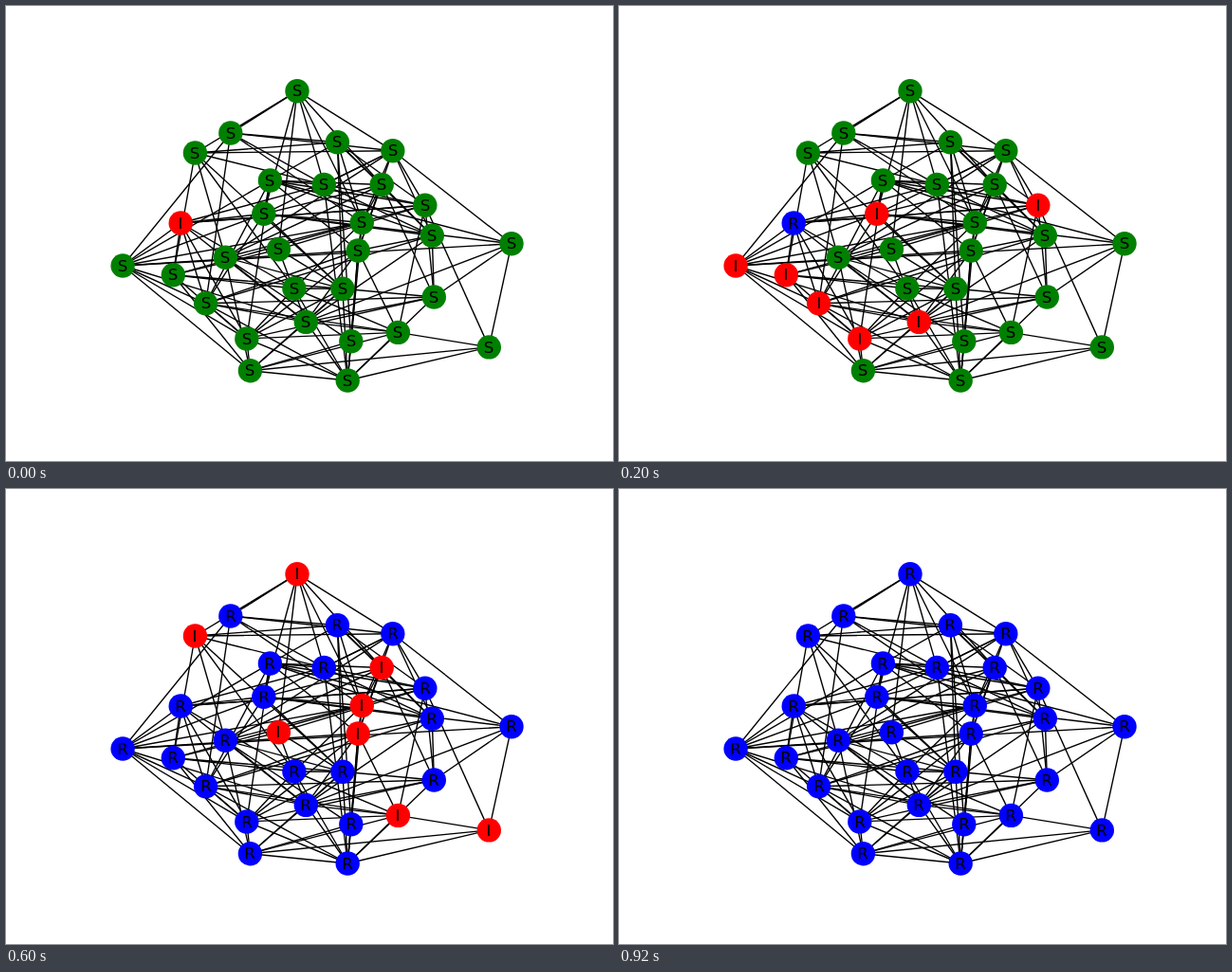
Recreate the animation shown at these times as an HTML page. Size 640 by 480 pixels, loop 1 s.

```html
<!DOCTYPE html>
<html lang="en">
<head>
<meta charset="utf-8">
<title>Epidemic on a network</title>
<style>
html, body { margin: 0; width: 100%; height: 100%; overflow: hidden; background: #fff; }
svg { display: block; width: 100vw; height: 100vh; }
line { stroke: #000; stroke-width: 1.39; }
text { font: 16.67px "DejaVu Sans", sans-serif; text-anchor: middle; fill: #000; }
</style>
</head>
<body>
<svg id="stage" viewBox="0 0 640 480"></svg>
<script>
const STEP = 200, STEPS = 5;
const COLORS = { S: '#008000', I: '#ff0000', R: '#0000ff' };

// key: x, y, step at which the node is infectious
const nodes = {
  a: [307, 89.7, 3], b: [236.8, 134, 2], c: [199.4, 155, 3],
  d: [349.4, 143.8, 2], e: [407.8, 152.7, 2], f: [278.4, 184, 2],
  g: [335.3, 188.4, 2], h: [396.2, 188.5, 3], i: [441.8, 210.2, 1],
  j: [271.8, 219.3, 1], k: [184.2, 229, 0], l: [375.3, 228.5, 3],
  m: [449.3, 242.2, 2], n: [533, 250.8, 2], o: [123.1, 274, 1],
  p: [176.3, 283.8, 1], q: [231.3, 265.3, 2], r: [287.4, 256.7, 3],
  s: [371.2, 258, 3], t: [303.9, 298, 2], u: [354.9, 298.3, 2],
  v: [451.3, 307, 2], w: [210.6, 313.8, 1], x: [316.3, 333.4, 1],
  y: [253.8, 350.9, 1], z: [363.8, 353.8, 2], A: [413.4, 344.4, 3],
  B: [509.3, 359.9, 3], C: [257.4, 384.7, 2], D: [360.2, 395, 2]
};

// each word: a node followed by its neighbours
const links = `abcjrglhe bdeglwo cdegptqu dfhimluz enimjqlsg fghimnwyjs
  gimkD hvmjslq ivAkqrB jmoulwn kiopwxyjt lDps mvsxw nBoxv
  owyCxfls pyCtru quxCz rux swyADxz tuDylA uvxCD vwxyD
  wxADy xADC yACDu zCD ABDC BCD CD`.trim().split(/\s+/);

const stage = document.getElementById('stage');

function add(tag, attrs) {
  const el = document.createElementNS('http://www.w3.org/2000/svg', tag);
  for (const name in attrs) el.setAttribute(name, attrs[name]);
  return stage.appendChild(el);
}

for (const [from, ...others] of links) {
  const [x1, y1] = nodes[from];
  for (const to of others) {
    const [x2, y2] = nodes[to];
    add('line', { x1, y1, x2, y2 });
  }
}

const discs = Object.values(nodes).map(([cx, cy, onset]) => ({
  onset,
  disc: add('circle', { cx, cy, r: 12.7 }),
  label: add('text', { x: Math.round(cx), y: Math.round(cy + 5.6) })
}));

function show(step) {
  for (const { onset, disc, label } of discs) {
    const state = step < onset ? 'S' : step === onset ? 'I' : 'R';
    disc.setAttribute('fill', COLORS[state]);
    label.textContent = state;
  }
}

let current = 0;
show(current);
const start = performance.now();

function tick() {
  const step = Math.floor((performance.now() - start) / STEP) % STEPS;
  if (step !== current) show(current = step);
  requestAnimationFrame(tick);
}
requestAnimationFrame(tick);
</script>
</body>
</html>
```
